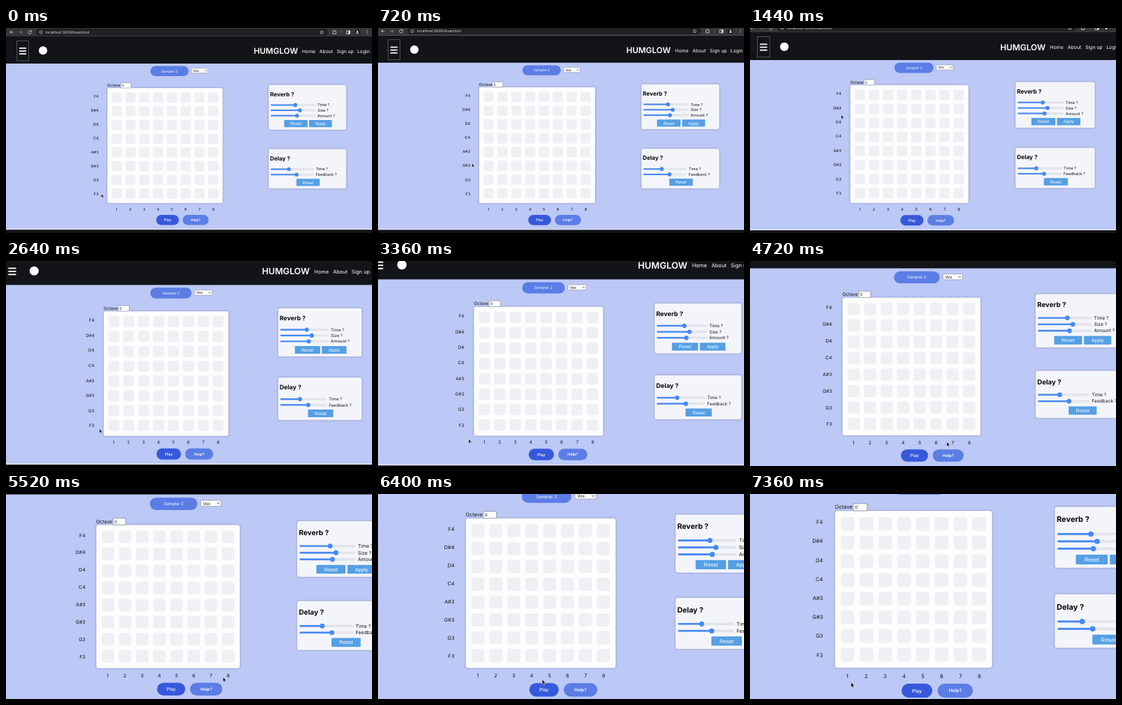
An HTML page that plays this animation: 524 by 294 pixels, repeating every 7.44 s.

```html
<!DOCTYPE html>
<html lang="en">
<head>
<meta charset="utf-8">
<title>Step sequencer zoom</title>
<style>
  html, body { margin: 0; width: 100%; height: 100%; overflow: hidden; background: #bcc8f5; }
  svg { display: block; width: 100%; height: 100%; }
  text { font-family: Inter, sans-serif; text-rendering: geometricPrecision; white-space: pre; }
  .form { font-family: "Liberation Sans", Arial, sans-serif; }
  .card { filter: drop-shadow(0 .4px .8px #6670a099); }
</style>
</head>
<body>
<svg viewBox="0 0 524 294"><g id="scene"></g></svg>
<script>
const LOOP = 7440, STEP = 80;
const CENTER = { x: 210, y: 256.5 };
const DARK = '#131417', BLUE = '#5b7de6', SKY = '#559fe5', INK = '#141418';

const rect = (x, y, x2, y2, fill, r = 0, extra = '') =>
  `<rect x="${x}" y="${y}" width="${x2 - x}" height="${y2 - y}" rx="${r}" fill="${fill}" ${extra}/>`;
const circle = (x, y, r, fill, extra = '') =>
  `<circle cx="${x}" cy="${y}" r="${r}" fill="${fill}" ${extra}/>`;
const line = (d, color, width = .8) =>
  `<path d="${d}" fill="none" stroke="${color}" stroke-width="${width}"/>`;
// y is the middle of the capitals
const text = (str, x, y, size, fill = INK, anchor = 'start', extra = '') =>
  `<text x="${x}" y="${y + size * .36}" font-size="${size}" fill="${fill}" text-anchor="${anchor}" ${extra}>${str}</text>`;

const pill = (label, x, y, x2, y2, fill, size, weight, color) =>
  rect(x, y, x2, y2, fill, (y2 - y) / 2) +
  text(label, (x + x2) / 2, (y + y2) / 2, size, color, 'middle', `font-weight="${weight}"`);
const button = (label, x, y, x2, y2) =>
  rect(x, y, x2, y2, SKY, .8) +
  text(label, (x + x2) / 2, (y + y2) / 2, 6, '#fff', 'middle', 'class="form"');
const slider = (label, y, thumb, end) =>
  rect(379, y - .9, end, y + .9, '#ececf0', .9, 'stroke="#b4b5bb" stroke-width=".3"') +
  rect(379, y - 1, thumb, y + 1, '#4489f5', 1) +
  circle(thumb, y, 2.8, '#4489f5') +
  text(label, end + 3.2, y, 5.55);
const card = (title, y, y2) =>
  rect(376, y, 487, y2, '#f4f5fa', 2.6, 'class="card" stroke="#a9b0c8" stroke-width=".3"') +
  text(title, 378.1, y + 13.2, 8.1, '#08080a', 'start', 'font-weight="700"');

function browserBar() {
  const grey = '#d5d6da';
  return rect(0, -4, 524, 12, '#35363a') + rect(43, 1, 461, 10.8, '#202124', 4.9) +
    line('M10.5 6H5.8M8 3.8L5.8 6L8 8.2', grey) +
    line('M18.5 6H23.2M21 3.8L23.2 6L21 8.2', '#85878c') +
    line('M36.2 5A2.4 2.4 0 1 0 36.4 6.6M36.5 3.4V5.2H34.7', grey) +
    circle(50, 6, 2.2, 'none', `stroke="${grey}" stroke-width=".6"`) +
    line('M50 5.7V7.2M50 4.7V5.2', grey, .6) +
    text('localhost:3000/musictool', 57, 6, 5.2, '#e4e5e8') +
    line('M452 3.4L452.8 5.2L454.6 5.4L453.2 6.6L453.6 8.4L452 7.4L450.4 8.4L450.8 6.6L449.4 5.4L451.2 5.2Z', grey, .6) +
    line('M468 4.4H469.4V3.6H470.8V4.4H472.4V8.4H468Z', grey) +
    line('M480 3V9', '#606267', .5) +
    line('M487.4 4H492.4V8.4H487.4Z', grey) + rect(490, 4, 492.4, 8.4, grey) +
    circle(503, 6, 3.6, '#17181a') + circle(503, 4.9, 1.2, grey) + rect(501, 6.4, 505, 8.2, grey, 1) +
    [3.9, 6, 8.1].map(y => circle(517, y, .55, grey)).join('');
}

function header() {
  const nav = [['Home', 424], ['About', 448.8], ['Sign up', 473.5], ['Login', 503]];
  return rect(0, 12, 524, 51, DARK) +
    rect(15.5, 18.3, 32.5, 47, 'none', 0, 'id="focus" stroke="#8b8c90" stroke-width=".5"') +
    [28.9, 33, 37.1].map(y => rect(18.8, y - .85, 29.1, y + .85, '#fff')).join('') +
    circle(53, 32.3, 6, '#fff') +
    text('HUMGLOW', 418, 33, 11.6, '#fff', 'end', 'font-weight="600"') +
    nav.map(([label, x]) => text(label, x, 33.4, 6.8, '#fff')).join('');
}

function sequencer() {
  const notes = ['F4', 'D#4', 'D4', 'C4', 'A#3', 'G#3', 'G3', 'F3'];
  let out = text('Octave', 145, 81.8, 5.55) +
    rect(145, 85.9, 310.4, 251.3, '#fdfdfe', 2.6, 'class="card" stroke="#a4aac2" stroke-width=".3"') +
    rect(164.4, 78.4, 179, 85.9, '#fff', .3, 'stroke="#72747c" stroke-width=".5"') +
    text('0', 166.1, 82.2, 4.9, INK, 'start', 'class="form"');
  notes.forEach((note, row) => {
    out += text(note, 132.6, 97.9 + row * 19.98, 5.6, INK, 'end') +
      text(row + 1, 158.2 + row * 19.82, 259.8, 5.6, INK, 'middle');
    for (let col = 0; col < 8; col++) {
      const x = 151.3 + col * 19.72, y = 92.4 + row * 19.67;
      out += rect(x, y, x + 14.6, y + 14.6, '#f0f0f4', 3.3);
    }
  });
  return out;
}

const controls = () =>
  pill('Sampler 2', 206.8, 54.6, 261.4, 69, BLUE, 4.75, 500, '#e9eeff') +
  rect(265.4, 57.8, 288.7, 64.6, '#fff', .8, 'stroke="#72747c" stroke-width=".4"') +
  text('Vox', 267.8, 61.2, 5, INK, 'start', 'class="form"') +
  line('M284 60.4L285.4 61.9L286.8 60.4', INK, .6) +
  pill('Play', 215.1, 267.9, 247.5, 282.6, '#3659dc', 5.1, 500, '#fff') +
  pill('Help?', 253, 267.9, 290.1, 282.6, BLUE, 4.9, 600, '#fff');

const effects = () =>
  card('Reverb ?', 81.6, 146) +
  slider('Time ?', 110.4, 414.1, 442.8) +
  slider('Size ?', 118.1, 420.7, 442.8) +
  slider('Amount ?', 125.8, 416.7, 442.8) +
  button('Reset', 398.3, 132.1, 431.8, 142.3) +
  button('Apply', 434, 132.1, 466.7, 142.3) +
  card('Delay ?', 173.6, 230.3) +
  slider('Time ?', 202.5, 405, 440.2) +
  slider('Feedback ?', 210.2, 416, 440.2) +
  button('Reset', 415.7, 216.3, 449.2, 226.5);

const scene = document.getElementById('scene');
scene.innerHTML = rect(0, 0, 524, 294, '#bcc8f5') + header() + browserBar() +
  rect(0, 288, 524, 289.3, '#e6eafa') + rect(0, 289.3, 524, 300, DARK) +
  sequencer() + controls() + effects() +
  '<path id="pointer" d="M0 0V5.2L1.2 4.1L2 5.9L2.9 5.5L2.1 3.8H3.7Z" fill="#000" stroke="#fff" stroke-width=".4"/>';
const pointer = document.getElementById('pointer');
const focusBox = document.getElementById('focus');

// [seconds, x, y] of the pointer on the unzoomed page
const path = [
  [0, 136.5, 238], [.25, 136.5, 238], [1.44, 132.5, 128], [1.76, 133, 98],
  [2.64, 139.5, 242], [3.36, 138.5, 255.5], [4.72, 270, 259], [5.2, 295, 261],
  [5.52, 291, 261.5], [7.36, 162, 266.5], [7.44, 160, 266.5]
];

function pointerAt(t) {
  const i = Math.max(1, path.findIndex(p => p[0] >= t));
  const [t0, x0, y0] = path[i - 1], [t1, x1, y1] = path[i];
  const k = (t - t0) / (t1 - t0);
  return [x0 + (x1 - x0) * k, y0 + (y1 - y0) * k];
}

// Eases in, then grows at a constant exponential rate
function zoomAt(t) {
  const rate = .049, lag = 1.05;
  return Math.exp(rate * (t < 2 * lag ? t * t / (4 * lag) : t - lag));
}

function draw(now) {
  const t = Math.floor(now % LOOP / STEP) * STEP / 1000;
  const { x, y } = CENTER;
  scene.setAttribute('transform', `translate(${x} ${y}) scale(${zoomAt(t)}) translate(${-x} ${-y})`);
  pointer.setAttribute('transform', `translate(${pointerAt(t)})`);
  focusBox.style.display = t < 2 ? '' : 'none';
  requestAnimationFrame(draw);
}
draw(performance.now());
</script>
</body>
</html>
```
